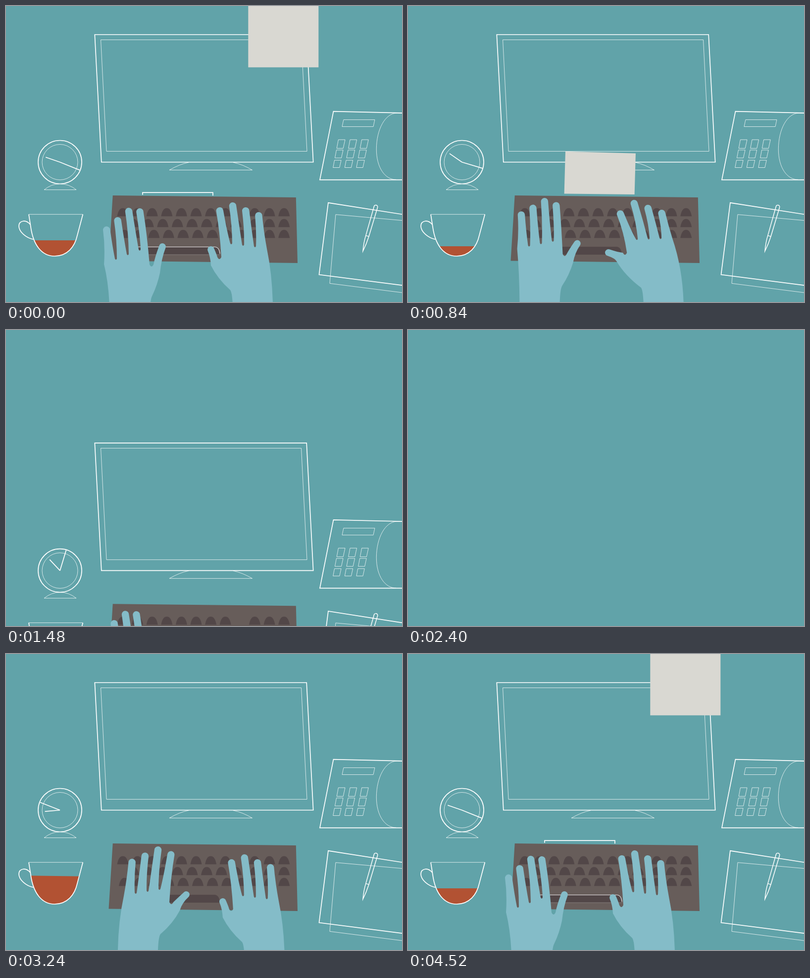
Recreate the animation shown at these times as an HTML page with a canvas. Size 800 by 600 pixels, loop 4.56 s.

```html
<!DOCTYPE html>
<html lang="en">
<head>
<meta charset="utf-8">
<title>Desk</title>
<style>
html, body { margin: 0; width: 100%; height: 100%; overflow: hidden; background: #61a3a9; }
canvas { display: block; }
</style>
</head>
<body>
<canvas id="stage" width="800" height="600"></canvas>
<script>
const ctx = document.getElementById('stage').getContext('2d');
const LOOP = 4560, STEP = 40, SPAN = LOOP - STEP;
const BG = '#61a3a9', BOARD = '#675d5a', KEY = '#524748', SKIN = '#84bcc8';
const GREY = '#d9d8d2', TEA = '#b25233';
const THICK = 1.7, THIN = 0.75;

const clamp = v => Math.max(0, Math.min(1, v));
const smooth = u => u * u * (3 - 2 * u);
const easeOut = u => 1 - (1 - u) ** 2;
const linear = u => u;

function stroke(width) {
  ctx.strokeStyle = '#fff';
  ctx.lineWidth = width;
  ctx.stroke();
}

function poly(points, open) {
  ctx.beginPath();
  points.forEach(([x, y]) => ctx.lineTo(x, y));
  if (!open) ctx.closePath();
}

function line(width, points, open) {
  poly(points, open);
  stroke(width);
}

function at(x, y, draw) {
  ctx.save();
  ctx.translate(x, y);
  draw();
  ctx.restore();
}

// Remaining distance of a part that slides in from 2400 ms on
function enter(s, dist, dur) {
  return s < 2000 ? 0 : dist * (1 - clamp((s - 2400) / dur)) ** 3;
}

// Downward slide of the whole desk: speeds up, then brakes
function slide(s) {
  if (s < 964 || s > 2000) return 0;
  if (s <= 1480) return 1.2457e-6 * (s - 964) ** 3;
  const u = clamp((s - 1480) / 320), v = 1 - u;
  return 171.1 * (1 + 2 * u) * v * v + 318 * u * v * v + 560 * smooth(u);
}

function monitor() {
  line(THICK, [[179.3, 58], [607.2, 58], [620.7, 316.5], [192.8, 316.5]]);
  line(THIN, [[191.5, 68.5], [596.5, 68.5], [608, 294.5], [203, 294.5]]);
  ctx.beginPath();
  ctx.moveTo(369, 317);
  ctx.quadraticCurveTo(351, 320.5, 330, 332.5);
  ctx.lineTo(497.5, 332.5);
  ctx.quadraticCurveTo(478, 321, 459, 317);
  stroke(THIN);
}

function phone() {
  const skew = y => 671.5 - (y - 271) * 0.19;
  line(THICK, [[1200, 226], [661.5, 213.7], [634, 352.3], [1200, 352.3]], true);
  line(THIN, [[682, 230.5], [745, 230.5], [742, 244.5], [679, 244.5]]);
  for (let row = 0; row < 3; row++) {
    for (let col = 0; col < 3; col++) {
      const top = 271 + row * 20.8, bottom = 288.5 + row * 19.5, dx = col * 23.6;
      line(THIN, [[skew(top) + dx, top], [skew(top) + dx + 13.5, top],
        [skew(bottom) + dx + 13, bottom], [skew(bottom) + dx, bottom]]);
    }
  }
  ctx.beginPath();
  ctx.moveTo(800, 217);
  ctx.lineTo(790, 217);
  ctx.bezierCurveTo(766, 217, 748.5, 250, 748.3, 290);
  ctx.bezierCurveTo(748.3, 328, 766, 352, 788, 352);
  stroke(THIN);
}

function papers(s) {
  at(enter(s, 175, 438), 0, () =>
    line(THICK, [[1300, 501], [651, 398.8], [632.5, 544.5], [1300, 630.5]], true));
  at(enter(s, 175, 573), 0, () =>
    line(THIN, [[1300, 479.5], [666, 422.7], [654, 562.3], [1300, 645]], true));
}

function pen(s) {
  at(721 + enter(s, 287, 633), 497, () => {
    ctx.rotate((16.2 + enter(s, 102, 633)) * Math.PI / 180);
    ctx.beginPath();
    ctx.moveTo(0, 0);
    ctx.quadraticCurveTo(-3.6, -18, -3.2, -32);
    ctx.lineTo(-3.7, -93.5);
    ctx.arc(0, -93.5, 3.7, Math.PI, 0);
    ctx.lineTo(3.2, -32);
    ctx.quadraticCurveTo(2.8, -16, 0, 0);
    ctx.closePath();
    stroke(1.5);
    line(1.3, [[-3.2, -32], [3.2, -32]], true);
  });
}

function clock(s) {
  let k = 1;
  if (s > 2000) {
    const u = clamp((s - 2800) / 380) - 1;
    k = 1 + 2.7 * u ** 3 + 1.7 * u ** 2;
    if (s <= 2800) return;
  }
  const t = s < 2000 ? s : s - SPAN;
  at(109, 316.5, () => {
    ctx.scale(k, k);
    for (const [r, w] of [[44, THICK], [36, THIN]]) {
      ctx.beginPath();
      ctx.arc(0, 0, r, 0, 7);
      stroke(w);
    }
    for (const [deg, len] of [[112 + 0.4222 * t, 43], [289 + 0.0188 * t, 30.5]]) {
      const a = deg * Math.PI / 180;
      line(THICK, [[0, 0], [len * Math.sin(a), -len * Math.cos(a)]], true);
    }
    ctx.beginPath();
    ctx.moveTo(-32, 56);
    ctx.quadraticCurveTo(-17, 44, 0, 44);
    ctx.quadraticCurveTo(18, 44, 33, 56);
    ctx.closePath();
    stroke(THIN);
  });
}

function bowl() {
  ctx.beginPath();
  ctx.moveTo(46, 422.3);
  ctx.lineTo(50, 448);
  ctx.bezierCurveTo(55, 484, 72, 507, 98, 507);
  ctx.bezierCurveTo(124, 507, 139, 488, 144, 465);
  ctx.lineTo(155.3, 422.3);
}

function cup(s) {
  const t = s < 2000 ? s + SPAN : s;
  const level = 450 + 37 * (1 - Math.cos(Math.PI * clamp((t - 3860) / 1073))) / 2;
  const swing = t - 2760;
  const tilt = t > 4200 ? 0 :
    3.2 * Math.exp(-Math.max(0, swing) / 600) * Math.cos(swing * Math.PI / 280);
  ctx.save();
  bowl();
  ctx.clip();
  poly([[40, level - tilt], [160, level + tilt], [160, 520], [40, 520]]);
  ctx.fillStyle = TEA;
  ctx.fill();
  ctx.restore();
  line(THIN, [[46, 422.3], [155, 422.3]], true);
  bowl();
  stroke(THICK);
  ctx.beginPath();
  ctx.moveTo(49, 443);
  ctx.bezierCurveTo(44, 437, 39, 435.5, 35, 436);
  ctx.bezierCurveTo(28, 437, 26, 441, 26, 446);
  ctx.bezierCurveTo(26, 458, 41, 470, 55, 473);
  stroke(THICK);
}

function dome(x, base) {
  ctx.beginPath();
  ctx.moveTo(x - 11.5, base);
  ctx.bezierCurveTo(x - 9.5, base - 11, x - 6, base - 16.5, x, base - 16.5);
  ctx.bezierCurveTo(x + 6, base - 16.5, x + 9.5, base - 11, x + 11.5, base);
  ctx.fill();
}

function keyboard(s) {
  const pitch = 29.6;
  poly([[215.7, 384], [585.8, 388], [589, 521], [207.5, 516.5]]);
  ctx.fillStyle = BOARD;
  ctx.fill();
  ctx.fillStyle = KEY;
  [236, 257.5, 239.5].forEach((left, row) => {
    const base = 426.3 + row * 22;
    for (let x = left; x < 480; x += pitch) {
      if (row === 2 || x < 470) dome(x, base);
    }
    for (let i = 0; i < 3; i++) dome(502.5 + i * pitch, base);
  });
  ctx.beginPath();
  ctx.moveTo(262, 504);
  ctx.lineTo(264, 488);
  ctx.lineTo(422, 488);
  ctx.quadraticCurveTo(431, 489, 432, 504);
  ctx.closePath();
  ctx.fill();
  if (s < 800 || s > 4200) {
    ctx.globalAlpha = 0.3;
    stroke(0.8);
    ctx.globalAlpha = 0.75;
    ctx.beginPath();
    ctx.moveTo(264, 488.5);
    ctx.lineTo(422, 488.5);
    ctx.quadraticCurveTo(431, 489, 432, 502);
    stroke(1.2);
    ctx.globalAlpha = 1;
  }
}

const PAGE_W = 142, PAGE_H = 188;
const PAGES = [
  { kind: 'text', start: 3684, x: 267.7 },
  { kind: 'blank', start: 4100, x: 461, drift: 70 },
  { kind: 'line', start: 4481, x: 276.6, drift: -206, dur: 688 },
  { kind: 'text', start: 17, x: 296 },
  { kind: 'blank', start: 262, x: 356.3, tilt: 0.028 },
  { kind: 'blank', start: 685, x: 318, tilt: 0.028 },
  { kind: 'text', start: 1077, x: 416, dur: 420 }
];

function page({ kind, start, x, drift = 0, tilt = 0, dur = 660 }, s, down) {
  const u = ((s - start + SPAN) % SPAN) / dur;
  if (u >= 1) return;
  const out = 640 * smooth(u);
  const edge = 384 + down - 2 - 9.5 * clamp((out - 75) / 50);
  ctx.save();
  poly([[0, -300], [800, -300], [800, edge + 6.4], [0, edge - 2.3]]);
  ctx.clip();
  ctx.translate(x + drift * u * u, 384 - out);
  ctx.rotate(tilt);
  if (kind === 'line') {
    ctx.beginPath();
    ctx.rect(0, 0, PAGE_W, PAGE_H);
    stroke(THICK);
  } else {
    ctx.fillStyle = kind === 'text' ? '#fff' : GREY;
    ctx.fillRect(0, 0, PAGE_W, PAGE_H);
    if (kind === 'text') {
      ctx.fillStyle = GREY;
      ctx.fillRect(18, 21, 53, 45);
      ctx.fillRect(18, 71.3, 106, 67.2);
      ctx.fillRect(18, 144, 85.7, 22);
    }
  }
  ctx.restore();
}

// x, y: middle fingertip; lean: shift of the knuckles; roll: slope of the row of tips;
// arch: how far the outer tips drop; reach: finger length; tx, ty: thumb tip
const pose = (x, y, lean, roll, arch, reach, tx, ty) =>
  ({ x, y, lean, roll, arch, reach, tx, ty });
const moved = (p, dx, dy) => ({ ...p, x: p.x + dx, y: p.y + dy });

const leftWide = pose(248, 409, -2, 9, 0.9, 96, 68, 72);
const leftFlat = pose(284, 401, -10, 1.5, 1, 92, 59, 85);
const leftHigh = pose(269, 379, -5, 3.5, 1, 95, 72, 86);
const leftLean = pose(311, 384, -21, 1.5, 1, 92, 57, 91);
const leftCurl = pose(302, 483, -20, 5, 0.3, 74, 39, 73);
const rightRest = pose(458, 398, -21, 0, 0.9, 88, 44, 89);
const rightFan = pose(440, 394, -31, -4, 1.45, 81, 52, 100);
const rightHigh = pose(471, 392, -28, -7, 1.4, 80, 52, 100);

const LEFT = [
  [0, leftWide], [480, leftFlat], [1160, leftHigh], [1480, moved(leftWide, -7, -11)],
  [2400, moved(leftCurl, 0, 140)], [2760, leftCurl, linear],
  [3200, moved(leftLean, -4, 6), easeOut], [3880, leftLean], [SPAN, leftWide]
];
const RIGHT = [
  [0, rightRest], [480, rightFan], [1160, rightHigh], [1480, moved(rightRest, 0, 60)],
  [2400, moved(rightRest, 190, 270)], [2760, moved(rightRest, 115, 139), linear],
  [3200, moved(rightRest, 24, 8), easeOut], [3880, moved(rightRest, 7, 13)],
  [SPAN, rightRest]
];

function poseAt(keys, s) {
  const i = Math.max(1, keys.findIndex(k => k[0] >= s));
  const [t0, a] = keys[i - 1], [t1, b, ease = smooth] = keys[i];
  const u = ease(clamp((s - t0) / (t1 - t0)));
  const p = {};
  for (const k in a) p[k] = a[k] + (b[k] - a[k]) * u;
  return p;
}

// Outline from the outer wrist over the fingers to the thumb and the inner wrist
function hand({ x, y, lean, roll, arch, reach, tx, ty }, side) {
  const spread = 22 - 0.2 * lean;
  const outer = -34 + 2.25 * lean, inner = outer + 81;
  const tip = k => k === 4 ? [tx, ty] :
    [(k - 2) * spread, arch * 11 * Math.abs(k - 2) - roll * (k - 2)];
  const gap = k => [lean + 24 * (k - 1),
    k === 3 ? 71 + reach / 2 : reach - (k - 1) * (3 + 0.7 * roll)];
  const [gx, gy] = gap(3);
  const base = [gx + 17, gy + 13];

  at(x, y, () => {
    ctx.scale(side, 1);
    ctx.beginPath();
    ctx.moveTo(outer, 600);
    ctx.lineTo(outer, 225);
    ctx.quadraticCurveTo(outer, reach + 65, ...gap(-1));
    for (let k = 0; k < 5; k++) {
      const r = k === 4 ? 6.8 : 7.2;
      const [ax, ay] = gap(k - 1), [ex, ey] = k === 4 ? base : gap(k);
      const [cx, top] = tip(k), cy = top + r;
      const dx = cx - (ax + ex) / 2, dy = cy - (ay + ey) / 2;
      const dir = Math.atan2(dy, dx);
      const from = dir - Math.PI / 2, to = dir + Math.PI / 2;
      const x0 = cx + r * Math.cos(from), y0 = cy + r * Math.sin(from);
      const x1 = cx + r * Math.cos(to), y1 = cy + r * Math.sin(to);
      const bx = dx * 0.65, by = dy * 0.5;
      ctx.quadraticCurveTo(x0 - bx, y0 - by, x0, y0);
      ctx.arc(cx, cy, r, from, to);
      if (k === 4) {
        ctx.quadraticCurveTo(x1 - bx, y1 - by, ex, ey);
      } else {
        const g = k === 3 ? 4 : 2;
        ctx.quadraticCurveTo(x1 - bx, y1 - by, ex - g, ey - g);
        ctx.quadraticCurveTo(ex, ey + g, ex + g, ey - g);
      }
    }
    const [bx, by] = base, wx = inner + 5, wy = 178;
    ctx.quadraticCurveTo(bx + 0.35 * (wx - bx), by + 0.55 * (wy - by), wx, wy);
    ctx.quadraticCurveTo(inner, wy + 8, inner, 225);
    ctx.lineTo(inner, 600);
    ctx.closePath();
    ctx.fillStyle = SKIN;
    ctx.fill();
  });
}

function draw(s) {
  ctx.fillStyle = BG;
  ctx.fillRect(0, 0, 800, 600);
  if (s >= 1800 && s < 2400) return;
  const down = slide(s);
  at(0, down, () => {
    at(0, -enter(s, 350, 633), monitor);
    at(enter(s, 287, 633), 0, phone);
    papers(s);
    pen(s);
    clock(s);
    at(-enter(s, 212, 633), 0, () => cup(s));
  });
  PAGES.forEach(p => page(p, s, down));
  at(0, down, () => {
    at(0, enter(s, 220, 604), () => keyboard(s));
    hand(poseAt(LEFT, s), 1);
    hand(poseAt(RIGHT, s), -1);
  });
}

const begin = performance.now();

function tick() {
  const t = (performance.now() - begin) % LOOP;
  draw(Math.floor(t / STEP) * STEP);
  requestAnimationFrame(tick);
}
tick();
</script>
</body>
</html>
```
